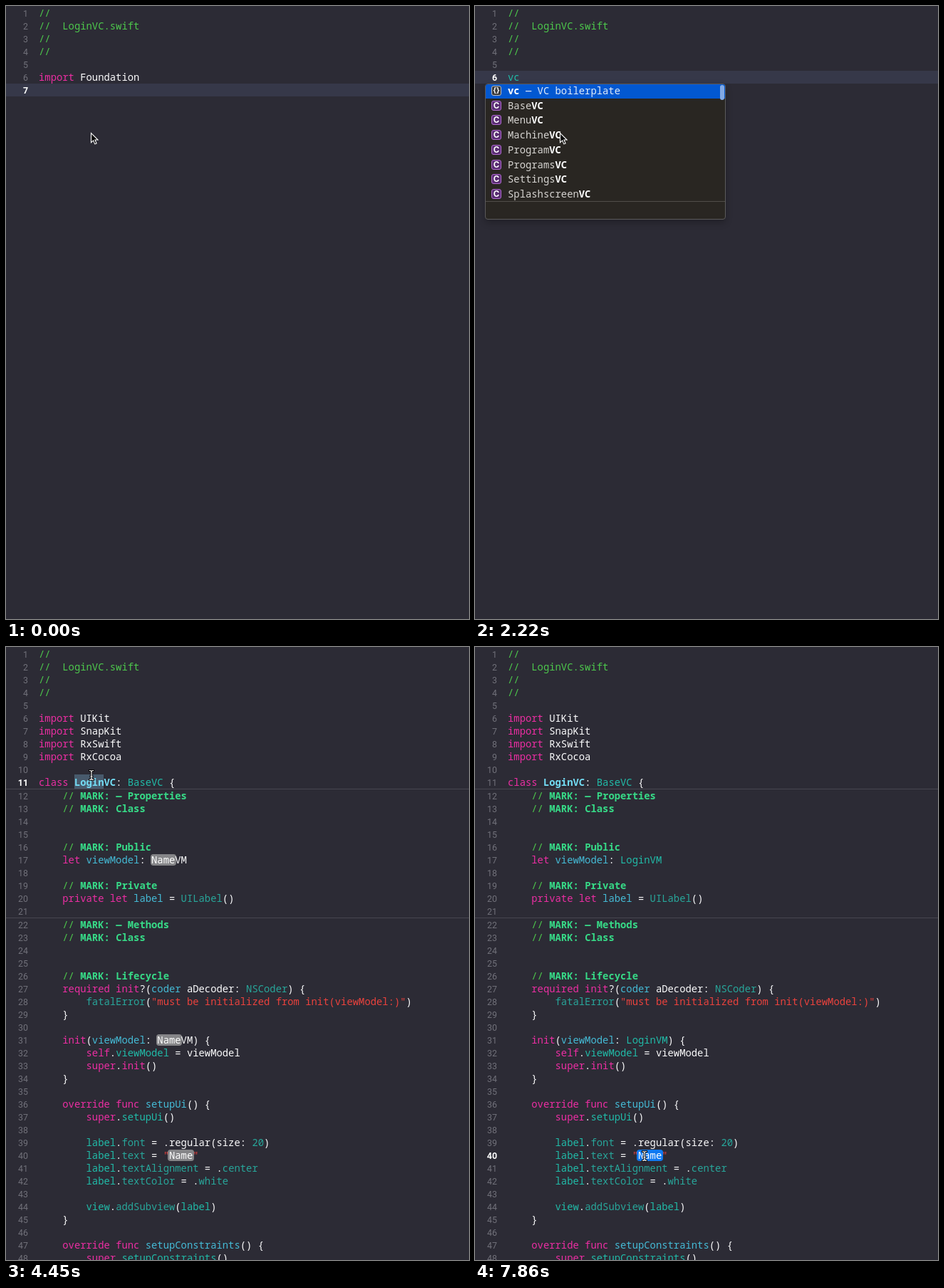
An HTML page for the animation above (8 s loop, 650x861 px).

```html
<!DOCTYPE html>
<html lang="en">
<head>
<meta charset="utf-8">
<title>Editor snippet</title>
<style>
html, body { margin: 0; width: 100%; height: 100%; overflow: hidden; background: #2c2b35; }
#stage { position: relative; width: 650px; height: 861px; overflow: hidden; background: #2c2b35;
  color: #fbfbfc; font: 500 13.87px/18px "Noto Sans Mono", monospace; font-variant-ligatures: none; }
#stage div, #stage svg { position: absolute; }
.row { left: 0; width: 650px; height: 18px; white-space: pre; }
.hi { background: #363849; }
.code { left: 46px; top: 0; }
.num { left: 0; top: .5px; width: 31px; text-align: right; color: #71717a; font: 12.4px/18px Roboto, sans-serif; }
.now { color: #fff; font-weight: 600; }
.rule { left: 0; width: 650px; height: 1px; background: #474650; }
.caret { display: inline-block; width: 1.5px; height: 16px; margin: 1px -1.5px 0 0; vertical-align: top; background: #fff; }
.p { color: #ec2ea3; }
.c { color: #4dc74c; }
.m { color: #37da87; font-weight: 700; }
.t { color: #21bba8; }
.k { color: #28a69a; }
.b { color: #45bbd6; }
.d, .g { color: #73dcf4; font-weight: 600; }
.r { color: #eb423d; }
.g, .x { background: #485a6c; padding: 1px 0; }
.h, .s { color: #fff; background: #858588; border-radius: 4px; margin: 0 -1.5px; padding: 0 1.5px;
  display: inline-block; height: 16px; line-height: 16px; }
.s { background: #0f79f2; }
#popup { left: 14px; top: 109px; width: 336px; height: 189px; border: 1px solid #5b5a5b; border-radius: 4px;
  background: #292622; overflow: hidden; color: #d6d4d1; box-shadow: 0 4px 10px #0004; }
.item { left: 0; width: 336px; height: 20.7px; line-height: 20.7px; white-space: pre; }
.item span { position: absolute; left: 31px; }
.item b { color: #fff; }
.item:first-child { background: #0258d1; color: #e3ecfa; }
.icon { left: 8px; top: 3px; width: 12px; height: 12px; border: 1px solid #b16bd2; border-radius: 3px; background: #592d72;
  color: #fff; font: 700 11.5px/12px Inter, sans-serif; text-align: center; }
.item:first-child .icon { background: #393a3d; border-color: #bcbcbc; font-size: 10px; line-height: 11px; }
.split { left: 0; top: 164px; width: 336px; height: 1px; background: #514e4a; }
.thumb { left: 329px; top: 1px; width: 6px; height: 21px; border-radius: 3px; background: #82a9e5; }
#mouse { left: 0; top: 0; overflow: visible; }
#beam { fill: none; stroke-linecap: square; }
</style>
</head>
<body>
<div id="stage">
  <div id="lines"></div>
  <div id="popup"></div>
  <svg id="mouse" width="1" height="1">
    <path id="arrow" d="M0 0V13.2L3.1 10.4L5.3 15.4L7.6 14.4L5.4 9.5H9.5Z" fill="#000" stroke="#fff" stroke-width="1.1"/>
    <g id="beam">
      <path id="ibeam" d="M-2.5-6.5Q0-6.5 0-4.5Q0-6.5 2.5-6.5M0-4.5V4.5M-2.5 6.5Q0 6.5 0 4.5Q0 6.5 2.5 6.5M-1 2H1" stroke="#000" stroke-width="3"/>
      <use href="#ibeam" style="display:none"/>
    </g>
  </svg>
</div>
<script>
const $ = id => document.getElementById(id);
const LOOP = 8000, BEATS = 54;

const CUE = { beam: 2, caret: 3, select: 5, type: 10, popup: 13, arrow: 14, expand: 16, rename: 24,
  indexed: 27, copy: 30, pickProperty: 38, pasteProperty: 41, pickInit: 48, pasteInit: 49, pickText: 53 };

// Which line has the focus; a selection hides the line highlight
const focus = (cue, line, selecting) => ({ from: CUE[cue] || 0, line, selecting });
const FOCUS = [
  focus('start', 7), focus('select', 6, true), focus('type', 6),
  focus('expand', 11, true), focus('rename', 11), focus('copy', 11, true),
  focus('pickProperty', 17, true), focus('pasteProperty', 17),
  focus('pickInit', 31, true), focus('pasteInit', 31), focus('pickText', 40, true)];

const HOME = { x: 120, y: 180 };
const TRIPS = [
  { from: 33, to: 38, x: 221, y: 299 },
  { from: 43, to: 45, x: 236, y: 626 },
  { from: 46, to: 47, x: 231, y: 552 },
  { from: 50, to: 52, x: 238, y: 715 }];

function pointer(beat) {
  return TRIPS.reduce((spot, { from, to, x, y }) => {
    const p = Math.min(1, Math.max(0, (beat - from + 1) / (to - from + 1)));
    const eased = p * p * (3 - 2 * p);
    return { x: spot.x + (x - spot.x) * eased, y: spot.y + (y - spot.y) * eased };
  }, HOME);
}

// [x text] becomes a span of class x, a bar becomes the caret
const paint = (text, caret) => text
  .replace(/\[(\w) ([^\]]*)\]/g, '<span class="$1">$2</span>')
  .replace('|', caret ? '<span class="caret"></span>' : '');

const HEADER = ['[c //]', '[c //  LoginVC.swift]', '[c //]', '[c //]', ''];
const mark = text => `    [c //] [m MARK: ${text}]`;

function draft(beat) {
  const typed = 'vc'.slice(0, beat - CUE.type + 1);
  const line = beat < CUE.select ? '[p import] Foundation'
    : beat < CUE.type ? '[x import Foundation]'
    : `[t ${typed}]${beat < CUE.popup ? '|' : ''}`;
  return [...HEADER, line, beat >= CUE.caret ? '|' : ''];
}

function className(beat) {
  if (beat < CUE.rename) return '[s Name]VC';
  if (beat < CUE.indexed) return 'Login'.slice(0, 2 * (beat - CUE.rename + 1)) + '|VC';
  if (beat < CUE.copy) return '[d Login]|[d VC]';
  return beat < CUE.pickProperty ? '[g Login][d VC]' : '[d LoginVC]';
}

function modelType(beat, pick, paste) {
  if (beat < paste) return `[${beat < pick ? 'h' : 's'} Name]VM`;
  return beat === paste ? 'Login|VM' : '[t Login]|[t VM]';
}

function template(beat) {
  const indexed = beat >= CUE.indexed;
  const decl = name => indexed ? `[b ${name}]` : name;
  const label = indexed ? '[t label]' : 'label';
  const init = indexed ? '[p init]' : '[t init]';
  return [...HEADER,
    ...['UIKit', 'SnapKit', 'RxSwift', 'RxCocoa'].map(lib => `[p import] ${lib}`),
    '',
    `[p class] ${className(beat)}: [t BaseVC] {`,
    mark('— Properties'), mark('Class'), '', '',
    mark('Public'),
    `    [p let] ${decl('viewModel')}: ${modelType(beat, CUE.pickProperty, CUE.pasteProperty)}`,
    '',
    mark('Private'),
    `    [p private let] ${decl('label')} = [k UILabel]()`,
    '',
    mark('— Methods'), mark('Class'), '', '',
    mark('Lifecycle'),
    `    [p required init]?(${decl('coder')} aDecoder: [k NSCoder]) {`,
    '        [k fatalError]([r "must be initialized from init(viewModel:)"])',
    '    }', '',
    `    ${init}([b viewModel]: ${modelType(beat, CUE.pickInit, CUE.pasteInit)}) {`,
    '        [p self].[t viewModel] = viewModel',
    `        [p super].${init}()`,
    '    }', '',
    '    [p override func] [b setupUi]() {',
    '        [p super].[t setupUi]()',
    '',
    `        ${label}.[k font] = .regular(size: [k 20])`,
    `        ${label}.[k text] = [r "][${beat < CUE.pickText ? 'h' : 's'} Name][r "]`,
    `        ${label}.[k textAlignment] = .[k center]`,
    `        ${label}.[k textColor] = .[k white]`,
    '',
    `        [t view].[k addSubview](${label})`,
    '    }', '',
    '    [p override func] [b setupConstraints]() {',
    '        [p super].[t setupConstraints]()'];
}

// Each MARK section starts with a one-pixel rule
const lineTop = n => 1 + 18 * (n - 1) + (n > 11) + (n > 21);

function render(beat) {
  const expanded = beat >= CUE.expand;
  const now = FOCUS.filter(entry => entry.from <= beat).pop();
  const caretOn = !now.selecting && beat - now.from < 6;
  const rows = (expanded ? template(beat) : draft(beat)).map((text, i) => {
    const n = i + 1, current = n === now.line;
    return `<div class="row${current && !now.selecting ? ' hi' : ''}" style="top:${lineTop(n)}px">` +
      `<div class="num${current ? ' now' : ''}">${n}</div>` +
      `<div class="code">${paint(text, current && caretOn)}</div></div>`;
  });
  const rules = expanded ? [12, 22].map(n => `<div class="rule" style="top:${lineTop(n) - 1}px"></div>`) : [];
  $('lines').innerHTML = [...rows, ...rules].join('');

  $('popup').hidden = beat < CUE.popup || expanded;
  $('popup').style.display = $('popup').hidden ? 'none' : '';
  const arrow = beat < CUE.beam || (beat >= CUE.arrow && !expanded);
  const { x, y } = pointer(beat);
  $('arrow').style.display = arrow ? '' : 'none';
  $('beam').style.display = arrow ? 'none' : '';
  $('mouse').style.transform = `translate(${x - arrow / 2}px, ${y - 1.5 * arrow}px)`;
}

const choices = ['Base', 'Menu', 'Machine', 'Program', 'Programs', 'Settings', 'Splashscreen'];
$('popup').innerHTML = ['<b>vc</b> — VC boilerplate', ...choices.map(name => `${name}<b>VC</b>`)]
  .map((text, i) => `<div class="item" style="top:${i * 20.7 - 1}px"><div class="icon">${i ? 'C' : '{}'}</div><span>${text}</span></div>`)
  .join('') + '<div class="split"></div><div class="thumb"></div>';

// White core over the dark outline of the text pointer
const core = $('ibeam').cloneNode();
core.removeAttribute('id');
core.setAttribute('stroke', '#fff');
core.setAttribute('stroke-width', 1.2);
$('beam').replaceChildren($('ibeam'), core);

const start = performance.now();
let shown = -1;
function tick() {
  const t = (performance.now() - start) % LOOP;
  const beat = Math.floor(t / LOOP * BEATS);
  if (beat !== shown) render(shown = beat);
  requestAnimationFrame(tick);
}
tick();
</script>
</body>
</html>
```
